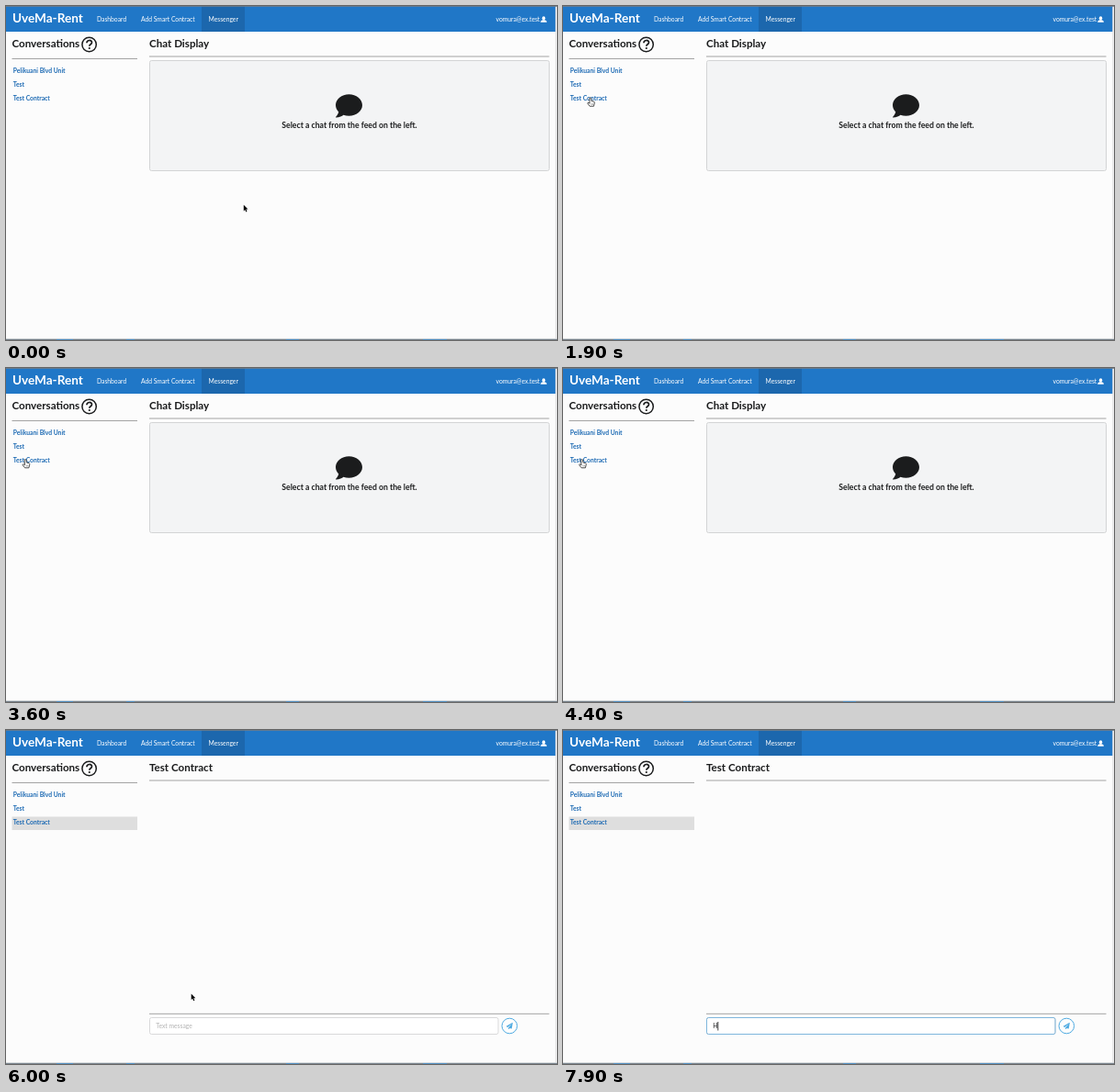
These frames come from a looping animation (600x364 px, 8000 ms). An HTML page:

```html
<!DOCTYPE html>
<html lang="en">
<head>
<meta charset="utf-8">
<title>Messenger</title>
<style>
  html, body { margin: 0; width: 100%; height: 100%; overflow: hidden; background: #fcfcfc; }
  svg { display: block; width: 600px; height: 364px; }
  text { font: 6.76px Lato, sans-serif; fill: #1b1c1d; white-space: pre; }
  .nav text { fill: #fff; }
  .nav .brand { font-size: 13.6px; font-weight: 700; }
  .head { font-size: 11.6px; font-weight: 700; }
  .note { font-size: 8.69px; font-weight: 700; text-anchor: middle; }
  .links text { font-weight: 700; fill: #1e6bb4; }
  .rule { stroke: #a3a3a3; stroke-width: 1; }
</style>
</head>
<body>
<svg viewBox="0 0 600 364">
  <rect width="600" height="364" fill="#fcfcfc"/>

  <g class="nav">
    <rect width="598.5" height="28" fill="#2077c7"/>
    <rect x="213" width="47" height="28" fill="#1c67ad"/>
    <text class="brand" x="7" y="18.4">UveMa-Rent</text>
    <text x="99" y="17">Dashboard</text>
    <text x="147" y="17">Add Smart Contract</text>
    <text x="220.5" y="17">Messenger</text>
    <text x="581.3" y="17" text-anchor="end">vomura@ex.test</text>
    <g fill="#fff">
      <ellipse cx="585.5" cy="13.3" rx="1.7" ry="2.1"/>
      <path d="M582.2 17.8v-.8q0-1.2 2.1-1.7h2.4q2.1.5 2.1 1.7v.8z"/>
    </g>
  </g>

  <text class="head" x="6.5" y="45">Conversations</text>
  <circle cx="90.6" cy="42" r="7.7" fill="none" stroke="#1b1c1d" stroke-width="1.5"/>
  <path d="M87.9 40.2c.2-3.6 5.6-3.5 5.6-.5 0 2-2.7 2-2.7 4" fill="none" stroke="#1b1c1d" stroke-width="1.7"/>
  <circle cx="90.8" cy="46" r="1.1" fill="#1b1c1d"/>
  <path class="rule" d="M6.5 57.5H143M156 55H591.5"/>

  <rect id="row" x="6.5" y="94.5" width="136.5" height="14.5" fill="#dedede"/>
  <g class="links">
    <text x="7.7" y="73">Pelikuani Blvd Unit</text>
    <text x="7.7" y="88">Test</text>
    <text x="7.7" y="102.8">Test Contract</text>
  </g>

  <text id="title" class="head" x="156" y="45"></text>

  <g id="empty">
    <rect x="156.5" y="59.5" width="435" height="120" rx="2" fill="#f3f4f5" stroke="#d3d4d5"/>
    <path transform="translate(359 94.4) scale(.0566)" fill="#1b1c1d" d="M256 32C114.600 32 0 125 0 240c0 50 21 95 57 131-12 50-54 95-55 96-5 5-1 13 6 13 66 0 116-32 141-51 32 12 69 19 107 19 141 0 256-93 256-208S397 32 256 32z"/>
    <text class="note" x="374" y="133.4">Select a chat from the feed on the left.</text>
  </g>

  <g id="chat">
    <path class="rule" d="M156 309.300H591.5"/>
    <rect x="156.500" y="313.5" width="379.500" height="18" rx="2" fill="#fff" stroke="#d9d9da"/>
    <rect id="focus" x="156.500" y="313.5" width="379.500" height="18" rx="2" fill="none" stroke="#7fb6dc"/>
    <text id="hint" x="163.300" y="325">Text message</text>
    <text id="typed" x="163.300" y="325">H</text>
    <path id="caret" stroke="#111" stroke-width=".8" d="M0 318v9.500"/>
    <circle cx="548.300" cy="322.500" r="8.300" fill="#fdfdfd" stroke="#4fabe2"/>
    <path transform="translate(544.700 319) scale(.0138)" fill="#4fabe2" d="M476 3L12 271c-18 10-15 35 3 43l106 44 287-253c6-5 14 3 9 9L176 407v80c0 24 28 33 42 16l64-77 125 52c14 6 30-3 33-18l72-432C515 8 493-7 476 3z"/>
  </g>

  <path d="M0 .5H600" stroke="#6f7c88" stroke-width=".8"/>
  <path d="M598.900 1V362" stroke="#d5d5d6" stroke-width=".8"/>
  <path d="M0 363.400H600" stroke="#7d8791" stroke-width="1.200"/>
  <path d="M55 363.500h18M131 363.500h9M305 363.500h14M454 363.500h26" stroke="#5793c4"/>

  <g id="arrow" stroke-linejoin="round">
    <path d="M0 0V6.600L1.500 5.200 2.600 7.700 3.700 7.200 2.600 4.800H4.700Z" fill="#000" stroke="#fff" stroke-width=".9" paint-order="stroke"/>
  </g>
  <g id="hand">
    <path d="M-1 0Q0-1 .9 0L1.200 3 4 3.800Q4.800 4.200 4.500 5.500L3.700 8.800H-.6L-3 5.700Q-3 4.500-1.800 4.900L-.7 5.800Z" fill="#fff" stroke="#222" stroke-width=".8" stroke-linejoin="round"/>
    <path d="M1.200 5.800v1.600M2.600 5.800v1.600" stroke="#444" stroke-width=".5"/>
  </g>
  <path id="beam" d="M-1.700-4.700Q0-4.700 0-3.500 0-4.700 1.700-4.700M0-3.500V3.500M-1.700 4.700Q0 4.700 0 3.500 0 4.700 1.700 4.700" fill="none" stroke="#333" stroke-width=".7"/>
</svg>
<script>
  const LOOP = 8000, STEP = 100;
  const OPEN = 4800, FOCUS = 6500, TYPE = 7900;
  const $ = id => document.getElementById(id);
  const show = (id, on) => { $(id).style.display = on ? '' : 'none'; };

  // Pointer stops: time, x, y
  const stops = [
    [0, 258.800, 216.800], [900, 37.300, 103.900], [1000, 37.300, 103.900],
    [1800, 30, 100.500], [2300, 27.800, 100], [2900, 27.500, 100],
    [3200, 23.800, 100], [3300, 23.800, 100], [3700, 20.700, 100],
    [5500, 20.700, 100], [6000, 201.700, 287.500], [6300, 224, 323], [LOOP, 224, 323]
  ];

  const ease = u => u * u * (3 - 2 * u);

  function pointerAt(t) {
    const i = stops.findIndex((s, n) => n && t < s[0]);
    const [t0, x0, y0] = stops[i - 1], [t1, x1, y1] = stops[i];
    const k = ease((t - t0) / (t1 - t0));
    return [x0 + (x1 - x0) * k, y0 + (y1 - y0) * k];
  }

  function pointerKind(t, x, y) {
    if (t >= TYPE) return null;
    if (t >= OPEN && y > 313) return 'beam';
    return x < 48 && y < 103.500 ? 'hand' : 'arrow';
  }

  function draw(now) {
    const t = Math.floor(now % LOOP / STEP) * STEP;
    const open = t >= OPEN, focused = t >= FOCUS, typed = t >= TYPE;

    $('title').textContent = open ? 'Test Contract' : 'Chat Display';
    show('empty', !open);
    show('chat', open);
    show('row', open);

    show('focus', focused);
    $('focus').style.opacity = t < FOCUS + STEP ? 0.5 : 1;
    show('hint', !typed);
    $('hint').style.fill = focused ? '#8a8a8a' : '#b3b3b3';
    show('typed', typed);
    show('caret', focused && (typed || (t - FOCUS) % 1000 < 500));
    $('caret').setAttribute('transform', `translate(${typed ? 168.800 : 163.800} 0)`);

    const [x, y] = pointerAt(t), kind = pointerKind(t, x, y);
    for (const id of ['arrow', 'hand', 'beam']) {
      show(id, id === kind);
      $(id).setAttribute('transform', `translate(${x} ${y})`);
    }
  }

  function tick() {
    draw(performance.now());
    requestAnimationFrame(tick);
  }
  tick();
</script>
</body>
</html>
```
